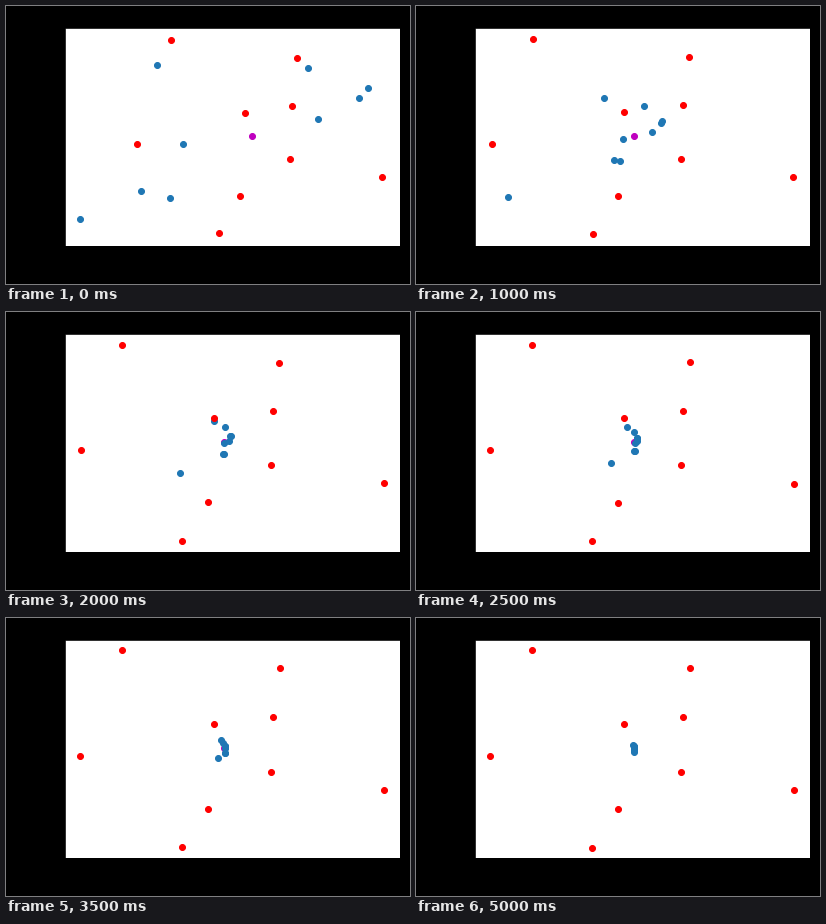
Animation of 404x278 px, one loop 5500 ms. Source, as a matplotlib script:

```python
import numpy as np
import matplotlib.pyplot as plt
from matplotlib.animation import FuncAnimation

W, H, DPI = 404, 278, 72
FRAMES, INTERVAL = 11, 500
LEFT, TOP, AX_W, AX_H = 58.8, 22.1, 334.8, 217.44
RADIUS, MARGIN = 3, 0.05
FAST, SLOW = 0.42, 0.73     # decay per step of the two modes
CATCH_UP, TOP_SPEED = 0.48, 45.5

# Fixed leaders, y pointing down; the swarm gathers at their mean.
leaders = np.array([
    (74, 138), (116, 32), (176, 229.7), (202, 191), (208, 106),
    (265, 153.6), (267, 99), (273.6, 50), (378.4, 171.8)])
center = leaders.mean(axis=0)

# Start offsets from the center.
straggler = np.array([-214.5, 85.4])
start = np.array([
    (-138.8, 56.7), (-102.9, 62.9), (-86.7, 8.5), (-119, -72.6),
    (69.6, -69.5), (82, -17.2), (132.9, -38.7), (144.1, -49)])

# The slow mode lies on an arc that bends left at its upper end.
arc_y = np.array([40, 40, 3, -74, -50, -4, -18, -20])
arc = np.column_stack([12 - (np.minimum(arc_y, 0) / 12) ** 2, arc_y])


def group(t):
    return (start - arc) * FAST ** t + arc * SLOW ** t


def chase():
    """The straggler runs after the second group member, at limited speed."""
    path = [straggler]
    for k in range(FRAMES - 1):
        gap = group(k + 0.5)[1] - path[-1]
        rate = min(CATCH_UP, TOP_SPEED / np.hypot(*gap))
        path.append(path[-1] + rate * gap)
    return path


trail = chase()


def followers(k):
    return center + np.vstack([trail[k], group(k)])


def limits(points):
    """Fit followers and leaders, padding leaders by a marker radius."""
    inner = np.vstack([points, center])
    low, high = inner.min(axis=0), inner.max(axis=0)
    pad = RADIUS * (high - low) * (1 + 2 * MARGIN) / (AX_W, AX_H)
    low = np.minimum(low, leaders.min(axis=0) - pad)
    high = np.maximum(high, leaders.max(axis=0) + pad)
    edge = (high - low) * MARGIN
    return low - edge, high + edge


fig = plt.figure(figsize=(W / DPI, H / DPI), dpi=DPI, facecolor="black")
ax = fig.add_axes([LEFT / W, 1 - (TOP + AX_H) / H, AX_W / W, AX_H / H])
ax.set_xticks([])
ax.set_yticks([])

ax.scatter(*center, s=36, color="m")
swarm = ax.scatter(*followers(0).T, s=36, color="C0")
ax.scatter(*leaders.T, s=36, color="r")


def update(k):
    points = followers(k)
    low, high = limits(points)
    swarm.set_offsets(points)
    ax.set_xlim(low[0], high[0])
    ax.set_ylim(high[1], low[1])
    return [swarm]


anim = FuncAnimation(fig, update, frames=FRAMES, interval=INTERVAL,
                     init_func=lambda: update(0), repeat=True)
plt.show()
```
